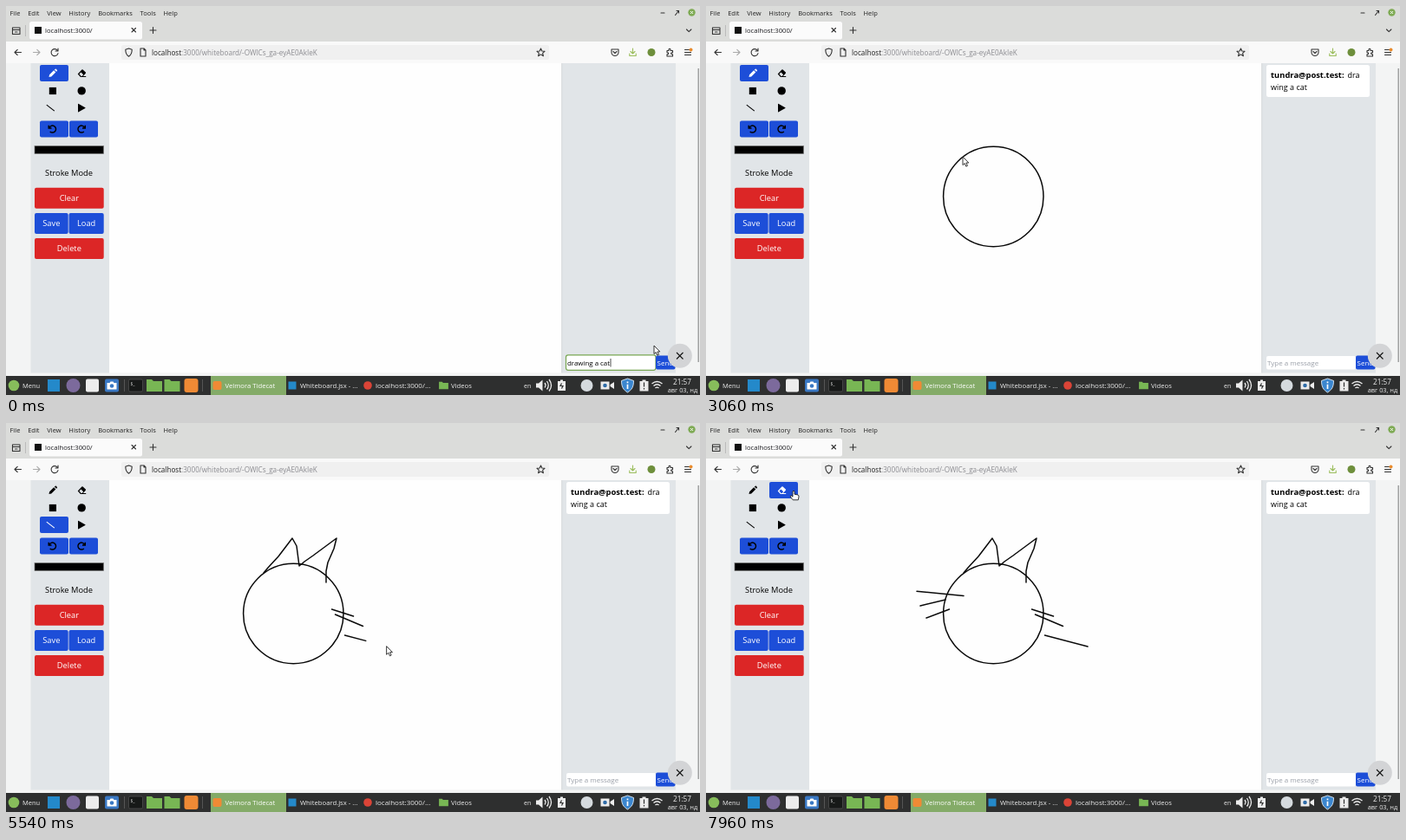
An HTML page for the animation above (8000 ms loop, 800 px wide and 449 px high).

```html
<!DOCTYPE html>
<html lang="en">
<head>
<meta charset="utf-8">
<title>Whiteboard</title>
<style>
html, body { margin: 0; height: 100%; overflow: hidden; background: #f3f4f5 }
svg { display: block; width: 100vw; height: 100vh; font: 7.7px "Open Sans", "Noto Sans", sans-serif }
text { white-space: pre }
.mid { text-anchor: middle }
.ui { fill: none; stroke: #333; stroke-width: 1.1; stroke-linecap: round; stroke-linejoin: round }
.tool rect { fill: none }
.tool.on rect, .blue { fill: #1d4ed8 }
.tool.on { color: #fff }
.tool path, .tool circle { fill: currentColor }
.red { fill: #dc2626 }
.ink { fill: none; stroke: #0a0a0a; stroke-width: 1.5; stroke-linecap: round; stroke-linejoin: round }
</style>
</head>
<body>
<svg viewBox="0 0 800 449" preserveAspectRatio="none">
<defs>
  <path id="folder" d="M-9-7h6l2 2H9V7H-9z"/>
  <path id="turn" d="M-3.700-1.400A4 4 0 1 1-2.800 2.900M-4.300-4.300v3.300h3.300" fill="none" stroke="#000" stroke-width="1.400"/>
</defs>

<!-- window bars -->
<path fill="#dbdcda" d="M0 0h800v41H0z"/>
<text id="menu" x="4.500" y="10.500" font-size="7.500" fill="#222"></text>
<circle cx="790.500" cy="7.500" r="4.200" fill="#7fab55"/>
<path stroke="#fff" stroke-width=".9" d="M789 6l3 3m0-3l-3 3"/>
<path stroke="#bbb" d="M22.500 22v13"/>
<rect x="27" y="18" width="130" height="20.500" rx="2.500" fill="#fbfbfb"/>
<rect x="33" y="24" width="8" height="8" fill="#111"/>
<text x="45" y="31" fill="#1b1b1f">localhost:3000/</text>
<path fill="#f9f9f9" d="M0 41h800v25H0z"/>
<rect x="133" y="45" width="493" height="17" rx="2.500" fill="#f0f0f0"/>
<g class="ui">
  <path d="M755 8h4M771.500 10.500l4-5h-2.500m2.500 0v2.500M784.500 27l2.700 2.700 2.700-2.700"/>
  <path d="M7.500 25H16v7.500H7.500zM7.500 27.500H16M10.500 30H13"/>
  <path d="M145 25.500l4.500 4.500m0-4.500L145 30M166 28h7m-3.500-3.500v7"/>
  <path d="M17.500 53.500H10m3.200-3.200L10 53.500l3.200 3.200"/>
  <path stroke="#aaa" d="M31.500 53.500H39m-3.200-3.200l3.200 3.200-3.200 3.200"/>
  <path d="M59.500 51.500a4 4 0 1 0 .5 3M60 49v3h-3"/>
  <path d="M141.500 49l3.700 1.200c0 4-1 6.400-3.700 8-2.700-1.600-3.700-4-3.700-8z"/>
  <path d="M155 49h4l2 2v7h-6zM159 49v2h2"/>
  <path d="M616.500 49l1.300 3 3.200.3-2.400 2.100.8 3.300-2.900-1.800-2.900 1.800.8-3.300-2.400-2.100 3.200-.3z"/>
  <path d="M698 50h8v3.500a4 4 0 0 1-8 0zM700 52.500l2 2 2-2"/>
  <path stroke="#9bbd5c" d="M722.500 49v6m-2.500-2.500l2.500 2.500 2.500-2.500M718.800 55v2.500h7.400V55"/>
  <path d="M762 51.500h2c-.5-3 2.500-3 2 0h2.500v2.200c-2.500-.3-2.500 2.300 0 2V58H762v-2.300c2.300.3 2.300-2.300 0-2z"/>
  <path d="M782.500 50.500h7m-7 3h7m-7 3h7"/>
</g>
<circle cx="744" cy="53.500" r="4.500" fill="#6e8f3c"/>
<circle cx="789.500" cy="50.500" r="2" fill="#e88b2e"/>
<text x="168" y="56.500" font-size="8.150" fill="#222">localhost<tspan fill="#8b8b90">:3000/whiteboard/-OWlCs_ga-eyAE0AkIeK</tspan></text>

<!-- page -->
<path fill="#f3f4f4" d="M0 66h800v361H0z"/>
<path fill="#e1e5e8" d="M28.500 66H119v357.500H28.500zM641 66h131v357.500H641z"/>
<path fill="#fefefe" d="M119 66h521.500v357.500H119z"/>
<path stroke="#c9cdd0" stroke-width=".7" d="M640.700 66v357.500"/>
<path stroke="#999" stroke-width="1.400" d="M798.200 72v339"/>
<g id="tools"></g>
<path d="M83 113.300q0-.8.800-.4l7.500 4.300q.6.400 0 .8l-7.500 4.300q-.8.400-.8-.4z"/>
<g id="buttons" class="mid" font-size="9.300"></g>
<use href="#turn" x="53.500" y="142"/>
<use href="#turn" transform="translate(87 142) scale(-1 1)"/>
<rect x="33" y="161.500" width="79.500" height="9" stroke="#777" stroke-width=".7"/>
<text x="72.500" y="195.500" font-size="9.300" class="mid">Stroke Mode</text>

<!-- chat -->
<g id="sent">
  <rect x="646" y="68" width="119" height="37" rx="2.500" fill="#fff"/>
  <g font-size="9">
    <text x="651" y="83" font-size="9.400" font-weight="700">tundra@post.test:</text>
    <text x="739.500" y="83">dra</text>
    <text x="651" y="97">wing a cat</text>
  </g>
  <rect x="646" y="404" width="103" height="15.500" rx="2" fill="#fff"/>
  <text x="647" y="414.800" font-size="8" fill="#9a9fa8">Type a message</text>
</g>
<g id="typed">
  <rect x="645.500" y="402.800" width="103.500" height="17.500" rx="2.500" fill="#fff" stroke="#78a653" stroke-width="1.200"/>
  <text x="647" y="414.800" font-size="7.900">drawing a cat</text>
  <path stroke="#000" stroke-width=".7" d="M697 407v9.500"/>
</g>
<rect class="blue" x="749" y="403.500" width="22.500" height="16" rx="2"/>
<text x="750.500" y="414.800" font-size="8" fill="#fff">Send</text>
<circle cx="776.800" cy="403.800" r="14" fill="#d3d4d6"/>
<path stroke="#111" stroke-width="1.100" d="M773 400l7.500 7.500m0-7.500l-7.500 7.500"/>

<!-- drawing -->
<circle id="head" class="ink" cx="331.300" cy="220"/>
<g id="ink"></g>

<!-- taskbar -->
<path fill="#2e2f2f" d="M0 427h800v22H0z"/>
<path fill="#84ab68" d="M236 427h87v22h-87z"/>
<circle cx="9" cy="438" r="6.300" fill="#87bd5b"/>
<path fill="#2489ca" d="M48 431h14v14H48zM325.500 433.500h9v9h-9z"/>
<circle cx="77.500" cy="438" r="8" fill="#7c6a9c"/>
<rect x="92" y="430.500" width="15" height="15" rx="2" fill="#ededed"/>
<rect x="114" y="430.500" width="16" height="15" rx="2" fill="#3a78c3"/>
<path fill="#fff" d="M116.500 435h3l1-1.500h3l1 1.500h3v7.500h-11z"/>
<circle cx="122" cy="438.500" r="2.300" fill="#3a78c3"/>
<path stroke="#555" d="M136.500 431v14M226.500 431v14"/>
<rect x="141.500" y="431" width="16" height="14" rx="1.500" fill="#171918" stroke="#555" stroke-width=".7"/>
<text x="143.500" y="437.500" font-size="5" fill="#ddd">$_</text>
<g fill="#78b654">
  <use href="#folder" x="171" y="438"/><use href="#folder" x="191.500" y="438"/>
  <use href="#folder" transform="translate(504.500 438) scale(.6)"/>
</g>
<rect x="205.500" y="430" width="16" height="16" rx="3" fill="#ef8a35"/>
<rect x="238.500" y="433" width="10" height="10" rx="2" fill="#ef8a35"/>
<circle cx="417" cy="438" r="4.800" fill="#db4437"/>
<g fill="#ececec">
  <text x="19" y="441" font-size="7.500">Menu</text>
  <text x="252.500" y="441" fill="#fff">Velmora Tidecat</text>
  <text x="339" y="441">Whiteboard.jsx - ...</text>
  <text x="426" y="441" font-size="8">localhost:3000/...</text>
  <text x="513" y="441">Videos</text>
  <text x="597" y="440.500" font-size="7">en</text>
  <text x="779.500" y="436.500" font-size="8.200" class="mid">21:57</text>
  <text x="780" y="445.500" font-size="7.400" class="mid">авг 03, нд</text>
  <path d="M611 435.500h3l4.500-4v13l-4.500-4h-3zM636 433h3v-1.500h3v1.500h3v11h-9z"/>
  <path d="M685.500 433.500h10v9h-10zM696.500 437l4.500-3v8l-4.500-3z"/>
  <path d="M730.500 433h3v-1.500h4v1.500h3v11.500h-10z"/>
</g>
<g fill="none" stroke="#ececec" stroke-width="1.300">
  <path d="M621 435q2 2.500 0 5.500M623.500 433q3.500 5 0 9.500M626 431q5 7 0 13.500"/>
  <path d="M744.500 436q6-5 12 0M746.500 438.500q4-3.500 8 0M748.500 441q2-1.800 4 0"/>
</g>
<path stroke="#2e2f2f" stroke-width="1.200" fill="none" d="M640.500 435.500l-1.500 3h3l-1.500 3M735.500 434.500v5m0 1.500v1.500"/>
<circle cx="669.500" cy="438" r="7" fill="#d5dade"/>
<circle cx="690.500" cy="438" r="2.300" fill="#2f6ca8"/>
<path fill="#3b86cf" stroke="#dfe9f2" stroke-width=".9" d="M716.500 430l7 2.500c0 7-2 10.500-7 13.500-5-3-7-6.500-7-13.500z"/>
<path stroke="#fff" stroke-width="1.700" d="M716.500 433.500v1.800m0 1.500v5.200"/>

<g id="pointer" fill="#fff" stroke="#222" stroke-width=".9" stroke-linejoin="round">
  <path id="arrow" d="M0 0V9.600L2.200 7.600 3.800 11.200 5.500 10.400 3.900 7H6.800z"/>
  <path id="hand" d="M-1 .8Q0-.5 1 .8V4.200L5 5Q6.200 5.400 6 7L5.300 10.800H-.8L-3.800 7Q-4 5.600-2.500 6L-1 7.200z"/>
</g>
</svg>
<script>
const $ = id => document.getElementById(id);
const show = (el, on) => { el.style.display = on ? '' : 'none'; };
const span = (t, a, b) => Math.min(1, Math.max(0, (t - a) / (b - a)));
const mix = (a, b, u) => a.map((v, i) => v + (b[i] - v) * u);
const dist = (a, b) => Math.hypot(b[0] - a[0], b[1] - a[1]);

const LOOP = 8000, SEND = 400, RADIUS = 57.7;
const LAG = 70; // ink trails the pointer

$('menu').innerHTML = 'File Edit View History Bookmarks Tools Help'.split(' ')
  .map((s, i) => `<tspan dx="${i && 8.8}">${s}</tspan>`).join('');

// tool grid, two per row, icons centred on 0,0
const icons = {
  pencil: '<path d="M-4 4.500l.6-2.800 5-5L3.800-1.100l-5 5zM2.300-4l1-.9q.6-.3 1 .1L5.400-3.700q.4.5 0 1l-.9.900z"/>',
  eraser: '<path fill-rule="evenodd" d="M-5 .8l4.700-5q.6-.5 1.200 0l3.200 3.200q.5.600 0 1.200l-3 3.200h3.400v1.100h-6.300zM-3.300 1L-1 3.300h.9L1.500 1.600-1.300-1.200z"/>',
  square: '<path d="M-3.700-3.700h8.200v8.200h-8.200z"/>',
  circle: '<circle r="4.700" cx="-.5" cy=".3"/>',
  line: '<path stroke="currentColor" stroke-width="1.100" d="M-6.700-3.500l9 7"/>'
};
const names = Object.keys(icons);
const toolAt = name => {
  const i = names.indexOf(name);
  return [55.5 + 34 * (i % 2), 77.6 + 20 * (i >> 1)];
};
$('tools').innerHTML = names.map(n => `<g class="tool" id="${n}" transform="translate(${toolAt(n)})">
  <rect x="-16.500" y="-9.500" width="33" height="19" rx="2"/><g transform="translate(-2)">${icons[n]}</g></g>`).join('');
// the right column sits closer to its button centre
names.forEach((n, i) => i % 2 && $(n).lastElementChild.setAttribute('transform', 'translate(-1.800)'));

const button = (label, color, x, y, w, h = 24) =>
  `<rect class="${color}" x="${x}" y="${y}" width="${w}" height="${h}" rx="2"/>
   <text x="${x + w / 2}" y="${y + 15.3}" fill="#fff">${label}</text>`;
$('buttons').innerHTML = button('', 'blue', 39, 132.5, 33, 19) + button('', 'blue', 73, 132.5, 33, 19) +
  button('Clear', 'red', 33, 209.7, 79.7) + button('Save', 'blue', 33, 238.9, 38.7) +
  button('Load', 'blue', 72.5, 238.9, 40.2) + button('Delete', 'red', 33, 268.1, 79.7);

// What the pointer does: start, end, then a tool to pick or points to follow.
// Between two acts it glides from one to the next.
const acts = [
  [0, 60, '747,392'], [180, SEND, '757,410'],
  [1100, 1320, 'circle'], [1660, 1880, '331,220 381,249'], [2090, 2120, '358,247'],
  [2420, 2540, 'pencil'], [2940, 2980, '300,177'], [3060, 3200, '296,174'],
  [3260, 4030, '297,173 302,167 314,154 330,133 335,142 338,165 344,160 354,153 381,133 378,145 371,161 369,171 369,184'],
  [4320, 4360, '59,115'], [4480, 4540, 'line'], [4880, 4920, '362,223'],
  [5000, 5120, '375.5,215 400.5,223'], [5190, 5320, '379.5,221 411.5,234.5'], [5400, 5545, '390.5,245 440,258'],
  [5720, 5770, '304,208'],
  [5840, 6060, '297,199.5 243,194.3'], [6200, 6400, '276,204 247,211'], [6680, 6710, '301,211'],
  [6820, 7000, '280.5,215 254,225'], [7200, 7220, '70,279'], [7420, 7460, '112,169'],
  [7680, 7800, 'eraser'], [7940, LOOP, '101,78']
].map(([a, b, what]) => {
  const tool = icons[what] && what;
  return { a, b, tool, pts: tool ? [toolAt(tool)] : what.split(' ').map(p => p.split(',').map(Number)) };
});
const drags = acts.filter(act => act.pts.length > 1);
const [radius, ...strokes] = drags;
$('ink').innerHTML = '<polyline class="ink"/>'.repeat(strokes.length);

// the part of a polyline covered after a share u of its length
function trace(pts, u) {
  const lengths = pts.slice(1).map((p, i) => dist(pts[i], p));
  let left = u * lengths.reduce((a, b) => a + b, 0);
  const out = [pts[0]];
  for (let i = 0; i < lengths.length && left > 0; i++) {
    out.push(mix(pts[i], pts[i + 1], Math.min(1, left / lengths[i])));
    left -= lengths[i];
  }
  return out;
}

const progress = (act, t) => trace(act.pts, span(t, act.a, act.b));

function pointerAt(t) {
  const i = acts.findIndex(act => t <= act.b), act = acts[i];
  if (t >= act.a) return progress(act, t).pop();
  const prev = acts[i - 1], u = span(t, prev.b, act.a);
  return mix(prev.pts[prev.pts.length - 1], act.pts[0], u * u * (3 - 2 * u));
}

function draw(t) {
  const [x, y] = pointerAt(t);
  const inBar = x > 33 && x < 113 && y > 67 && y < 292 && !(y > 152 && y < 210);
  const hand = inBar || (x > 749 && y > 403);
  $('pointer').setAttribute('transform', `translate(${x} ${y})`);
  show($('hand'), hand);
  show($('arrow'), !hand);
  show($('typed'), t < SEND);
  show($('sent'), t >= SEND);

  const picked = acts.filter(act => act.tool && (act.a + act.b) / 2 <= t).pop();
  const tool = picked ? picked.tool : 'pencil';
  names.forEach(n => $(n).classList.toggle('on', n === tool));

  const late = t - LAG;
  const edge = progress(radius, late).pop();
  show($('head'), late > radius.a);
  $('head').setAttribute('r', Math.min(RADIUS, dist(radius.pts[0], edge)));
  $('head').style.strokeWidth = t < 2090 ? 1.25 : 1.5;

  strokes.forEach((s, i) => {
    const line = $('ink').children[i];
    show(line, late > s.a);
    line.setAttribute('points', progress(s, late).join(' '));
  });
}

const begin = performance.now();
function frame(now) {
  draw(Math.max(0, now - begin) % LOOP);
  requestAnimationFrame(frame);
}
draw(0);
requestAnimationFrame(frame);
</script>
</body>
</html>
```
